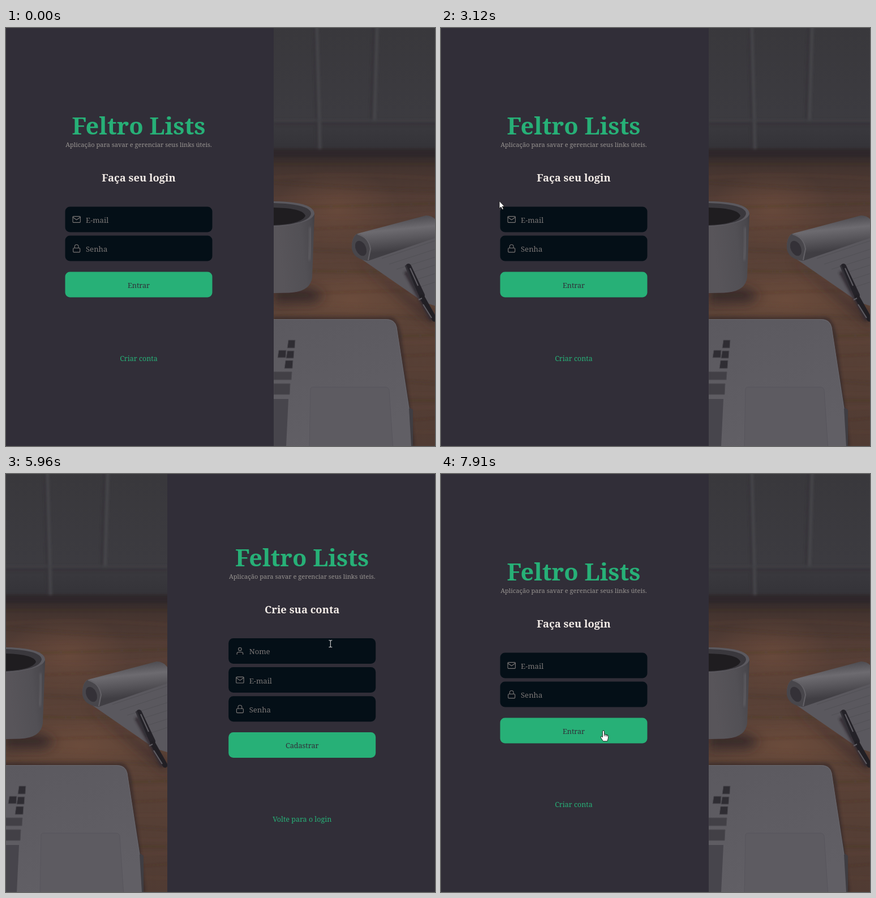
Write an HTML page that moves like this. It is 758 px wide and 738 px high and loops after 7.99 s.

```html
<!DOCTYPE html>
<html lang="pt-BR">
<head>
<meta charset="utf-8">
<title>Login</title>
<style>
  html, body { margin: 0; width: 100%; height: 100%; overflow: hidden; background: #312e38; }
  #stage { display: block; width: 758px; height: 738px; font-family: "Noto Serif", serif; }
  .mid { text-anchor: middle; }
  .brand { font-size: 41.5px; font-weight: 700; fill: #27b077; }
  .sub { font-size: 11.1px; fill: #979390; }
  .head { font-size: 18.4px; font-weight: 700; fill: #f4ede8; }
  .field { fill: #040f17; }
  .hint { font-size: 13.1px; fill: #7b7776; }
  .icon { fill: none; stroke: #7b7776; stroke-width: 1.7; stroke-linecap: round; stroke-linejoin: round; }
  .button { fill: #27b077; }
  .label { font-size: 12.6px; fill: #312e38; }
  .link { font-size: 12.5px; fill: #27b077; }
  .link.hover { opacity: .82; }
  .url { font: 9.2px "Open Sans", sans-serif; fill: #fff; }
</style>
</head>
<body>
<svg id="stage" viewBox="0 0 758 738">
  <defs>
    <filter id="soft" x="-20%" y="-20%" width="140%" height="140%"><feGaussianBlur stdDeviation="2"/></filter>
    <filter id="haze" x="-50%" y="-50%" width="200%" height="200%"><feGaussianBlur stdDeviation="9"/></filter>
    <linearGradient id="wall" x2="0" y2="1">
      <stop stop-color="#39383c"/><stop offset=".7" stop-color="#3c3b40"/>
      <stop offset=".92" stop-color="#353439"/><stop offset="1" stop-color="#2c292d"/>
    </linearGradient>
    <linearGradient id="wood" x2="0" y2="1">
      <stop stop-color="#2f282a"/><stop offset=".05" stop-color="#44342f"/>
      <stop offset=".16" stop-color="#533d35"/><stop offset=".5" stop-color="#5c4337"/>
      <stop offset="1" stop-color="#503b33"/>
    </linearGradient>
    <radialGradient id="glow">
      <stop stop-color="#7a5440" stop-opacity=".5"/><stop offset="1" stop-color="#7a5440" stop-opacity="0"/>
    </radialGradient>
    <linearGradient id="mug" x2="1" y2="-.25">
      <stop stop-color="#58555a"/><stop offset=".55" stop-color="#525055"/>
      <stop offset=".82" stop-color="#49474c"/><stop offset="1" stop-color="#38363b"/>
    </linearGradient>
    <linearGradient id="roll" x1=".4" y1="0" x2=".58" y2="1">
      <stop offset=".1" stop-color="#504e53"/><stop offset=".32" stop-color="#6d6b70"/>
      <stop offset=".52" stop-color="#5a585d"/><stop offset=".78" stop-color="#403e43"/>
    </linearGradient>
    <linearGradient id="metal" x2=".4" y2="1">
      <stop stop-color="#5b595f"/><stop offset="1" stop-color="#615f65"/>
    </linearGradient>

    <g id="photo">
      <path fill="url(#wall)" d="M473 0h290v225H473z"/>
      <g filter="url(#soft)" fill="none">
        <path stroke="#343338" stroke-width="4" d="M545 -8L550 222M473 169H763M650 -8L645 165"/>
        <path stroke="#4a494e" stroke-width="4" d="M549 -8L555 220M656 -8L651 165"/>
        <path stroke="#414045" stroke-width="3" d="M473 163H763"/>
      </g>
      <path fill="url(#wood)" d="M473 222h290v516H473z"/>
      <ellipse cx="585" cy="320" rx="110" ry="70" fill="url(#glow)"/>
      <ellipse cx="610" cy="480" rx="130" ry="60" fill="url(#glow)"/>
      <path filter="url(#soft)" fill="#2d282b" d="M465 214h310v13H465z"/>
      <g id="grain" fill="none" filter="url(#soft)"></g>

      <path filter="url(#haze)" fill="#2b2325" opacity=".7" d="M473 458h65l25 14-20 14H473z"/>
      <path fill="url(#mug)" d="M473 306Q545 308 545 330L541 440Q538 466 500 467.500L473 468z"/>
      <path fill="#5b595f" d="M473 306Q544 307 545 328Q540 346 473 351z"/>
      <path fill="#3a383d" d="M473 309Q539 311 539 328Q535 346 473 349z"/>
      <path fill="#1f1d20" d="M473 317Q526 318 529 332Q522 346 473 348z"/>
      <path filter="url(#soft)" fill="none" stroke="#605e63" stroke-width="4" d="M538 352Q539 385 535 410"/>
      <path filter="url(#soft)" fill="none" stroke="#5b595e" stroke-width="4" d="M499 372V400"/>

      <path filter="url(#haze)" fill="#2e2425" opacity=".55" d="M615 405L760 505V530z"/>
      <path fill="#5a585e" d="M628 408L763 362V492L738 484z"/>
      <path fill="none" stroke="#515055" d="M664 407L763 374M677 417L763 389M690 426L763 403M703 436L763 417M716 447L763 432M729 458L763 447"/>
      <path fill="url(#roll)" d="M621 363L742 331Q756 331 763 344V369L640 411Q613 408 611 388Q611 368 621 363z"/>
      <path fill="#48464b" d="M621 363Q641 368 645 390L640 411Q613 408 611 388Q611 368 621 363z"/>
      <ellipse cx="627" cy="389" rx="9" ry="14" fill="#343137" transform="rotate(-25 627 389)"/>
      <path fill="none" stroke="#636166" stroke-width="2" d="M621 364Q641 369 644 390L640 410"/>
      <path filter="url(#soft)" stroke="#312c30" stroke-width="6" d="M706 430L752 516"/>
      <path stroke="#242228" stroke-width="10" stroke-linecap="round" d="M711 421L735 472"/>
      <path stroke="#211f24" stroke-width="9" stroke-linecap="round" d="M735 475L757 514"/>
      <path stroke="#5e5c62" stroke-width="2" d="M714 424L728 455M729 480L735 477M737 488L752 512"/>
      <path fill="none" stroke="#333137" stroke-width="3" d="M706 419L724 464"/>

      <path filter="url(#soft)" fill="#2c2325" opacity=".5" d="M473 510H680Q695 513 699 545L723 738H473z"/>
      <path fill="#3f3d42" d="M690 528L713 670L719 674V738H680z"/>
      <path fill="url(#metal)" d="M473 514H672Q687 514 690 528L712 672L716 738H473z"/>
      <path fill="none" stroke="#6a686e" d="M473 514.500H672Q687 515 690 528L712 672"/>
      <path fill="#5d5b61" stroke="#57555c" d="M542 634H670Q676 634 677 640L684 745H536L538 639Q538 634 542 634z"/>
      <path fill="#47454c" d="M473 655H499L495 738H473z"/>
      <g fill="#2f2d33" stroke="#4c4a50">
        <path d="M499 551h12l-1 14h-13zM482 569h13l-1 13h-14zM497 570h12l-1 13h-13zM494 587h13l-1 14h-14z"/>
        <path fill="#424046" d="M473 607h32l-1 14h-31zM473 628h29l-1 19h-28z"/>
      </g>
    </g>

    <g id="mail"><rect x="2" y="4" width="20" height="16" rx="2"/><path d="M22 6l-10 7L2 6"/></g>
    <g id="lock"><rect x="3" y="11" width="18" height="11" rx="2"/><path d="M7 11V7a5 5 0 0 1 10 0v4"/></g>
    <g id="user"><path d="M20 21v-2a4 4 0 0 0-4-4H8a4 4 0 0 0-4 4v2"/><circle cx="12" cy="7" r="4"/></g>
  </defs>

  <path fill="#312e38" d="M0 0h758v738H0z"/>
  <g id="login"><svg x="473" width="285" height="738" viewBox="473 0 285 738"><use href="#photo"/></svg></g>
  <g id="signup"><svg width="285" height="738" viewBox="476 0 285 738"><use href="#photo"/></svg></g>

  <g id="status">
    <path id="statusBox" fill="#29313d"/>
    <text id="url" class="url" y="734.500"></text>
  </g>
  <circle id="click" r="10" fill="#c9c90c" opacity=".68"/>
  <g id="cursor" stroke-linejoin="round">
    <path id="arrow" fill="#fff" stroke="#111" stroke-width=".9" d="M0 0V13L3 10.300L5.200 15L7.300 14L5.200 9.500H9.300z"/>
    <g id="hand" stroke="#111" stroke-width=".9">
      <path fill="#fff" d="M-1.600 1.600a1.600 1.600 0 0 1 3.200 0V6.500l5.400 1.200q2 .6 1.700 2.800l-.5 4-1.400 4.300H-.5L-4.600 12.500q-.8-2 .9-2.300l2.100 1.500z"/>
      <path fill="none" d="M1.600 6.500V10M4.200 7.100V10.300M6.600 7.700V10.600"/>
    </g>
    <path id="text" fill="none" stroke="#d4d4d4" stroke-width="1.100" d="M-3 -6H-1L0 -5L1 -6H3M0 -5V5M-3 6H-1L0 5L1 6H3"/>
  </g>
</svg>

<script>
const LOOP = 7990;
const $ = id => document.getElementById(id);
const show = (el, on) => el.style.display = on ? '' : 'none';
const clamp = v => Math.max(0, Math.min(1, v));
const within = (t, [from, to]) => t >= from && t < to;

// Wood grain: slightly wavy streaks
let grain = '';
for (let i = 0; i < 26; i++) {
  const y = 240 + i * 19, bend = 7 * Math.sin(i * 2.3);
  grain += `<path d="M465 ${y + bend}Q610 ${y - bend} 770 ${y + 9 * Math.sin(i)}" stroke="${i % 2 ? '#6a4a3b' : '#3f2f2a'}" stroke-width="${2 + i % 3}" opacity=".25"/>`;
}
$('grain').innerHTML = grain;

// Builds a form and returns its hover zones
function form(id, cx, top, heading, fields, button, link) {
  const left = cx - 130, w = 260, h = 45;
  const zones = [
    [cx - 120, top - 166, 240, 49, 'text'],
    [left, top - 117, w, 14, 'text'],
    [cx - 65, top - 63, 130, 25, 'text']
  ];
  const mid = (cls, y, s) => `<text class="mid ${cls}" x="${cx}" y="${y}">${s}</text>`;
  const box = (cls, y, type) => {
    zones.push([left, y, w, h, type]);
    return `<rect class="${cls}" x="${left}" y="${y}" width="${w}" height="${h}" rx="8.500"/>`;
  };
  let out = mid('brand', top - 127.3, 'Feltro Lists')
    + mid('sub', top - 105.3, 'Aplicação para savar e gerenciar seus links úteis.')
    + mid('head', top - 44.1, heading);
  fields.forEach(([icon, hint], i) => {
    const y = top + i * 51.2;
    out += box('field', y, 'text')
      + `<use class="icon" href="#${icon}" transform="translate(${left + 12.2} ${y + 14.6}) scale(.667)"/>`
      + `<text class="hint" x="${left + 36.500}" y="${y + 28.4}">${hint}</text>`;
  });
  const by = top + fields.length * 51.2 + 12.6;
  out += box('button', by, 'hand') + mid('label', by + 28.1, button) + mid('link', by + 157.4, link);
  zones.push([cx - 53, by + 142, 106, 21, 'link']);
  $(id).insertAdjacentHTML('beforeend', out);
  return zones;
}

const mail = ['mail', 'E-mail'], lock = ['lock', 'Senha'];
const zones = {
  login: form('login', 234.5, 315.4, 'Faça seu login', [mail, lock], 'Entrar', 'Criar conta'),
  signup: form('signup', 523.2, 289.9, 'Crie sua conta', [['user', 'Nome'], mail, lock], 'Cadastrar', 'Volte para o login')
};
const links = { login: $('login').querySelector('.link'), signup: $('signup').querySelector('.link') };

// Each visit to a link: status bar, mouse press (page changes on release), address
const visits = [
  { bar: [3760, 4250], press: [3860, 4000], url: 'localhost:3000/register', width: 105 },
  { bar: [7090, 7890], press: [7510, 7640], url: 'localhost:3000', width: 66 }
];

// Pointer path: time, x, y
const path = [
  [460, 676, 721], [530, 692, 712], [1260, 692, 712], [1330, 691, 710],
  [1700, 470, 535], [2080, 235, 344], [2480, 165, 245], [2900, 126, 178],
  [3120, 103, 305], [3420, 150, 490], [3640, 227, 588], [3790, 237, 583],
  [4600, 237, 583], [5020, 430, 702], [5330, 620, 612], [5420, 643, 574],
  [5560, 642, 510], [5780, 626, 397], [5960, 574, 300], [6110, 406, 315],
  [6230, 475, 349], [6470, 598, 440], [6690, 590, 565], [6920, 547, 609],
  [7640, 547, 609], [7910, 287, 453], [LOOP, 287, 453]
];
const still = (a, b) => a[1] === b[1] && a[2] === b[2];

// Velocity at a point; zero next to a pause
function slope(i, k) {
  const a = path[i - 1], p = path[i], b = path[i + 1];
  if (!a || !b || still(a, p) || still(p, b)) return 0;
  return (b[k] - a[k]) / (b[0] - a[0]);
}

function pointer(t) {
  let i = 0;
  while (i < path.length - 2 && path[i + 1][0] <= t) i++;
  const a = path[i], b = path[i + 1], d = b[0] - a[0];
  const u = clamp((t - a[0]) / d), v = 1 - u;
  return [1, 2].map(k =>
    a[k] * v * v * (1 + 2 * u) + b[k] * u * u * (3 - 2 * u)
    + d * u * v * (v * slope(i, k) - u * slope(i + 1, k)));
}

function draw(t) {
  const page = within(t, visits.map(v => v.press[1])) ? 'signup' : 'login';
  show($('login'), page === 'login');
  show($('signup'), page === 'signup');

  const [x, y] = pointer(t);
  const zone = zones[page].find(z => x >= z[0] && x <= z[0] + z[2] && y >= z[1] && y <= z[1] + z[3]);
  const kind = zone ? zone[4] : 'arrow';
  show($('cursor'), t >= path[0][0]);
  $('cursor').setAttribute('transform', `translate(${x} ${y})`);
  show($('arrow'), kind === 'arrow');
  show($('hand'), kind === 'hand' || kind === 'link');
  show($('text'), kind === 'text');
  links[page].classList.toggle('hover', kind === 'link');

  show($('click'), visits.some(v => within(t, v.press)));
  $('click').setAttribute('cx', x);
  $('click').setAttribute('cy', y);

  const visit = visits.find(v => within(t, v.bar));
  show($('status'), visit);
  if (visit) {
    const { bar: [on, off], url, width } = visit;
    $('status').setAttribute('opacity', Math.min(clamp((t - on) / 80), clamp((off - t) / 80)));
    $('url').textContent = url;
    $('statusBox').setAttribute('d', `M0 723H${width - 3}q3 0 3 3V738H0z`);
  }
}

const start = performance.now();
function tick() {
  draw((performance.now() - start) % LOOP);
  requestAnimationFrame(tick);
}
tick();
</script>
</body>
</html>
```
